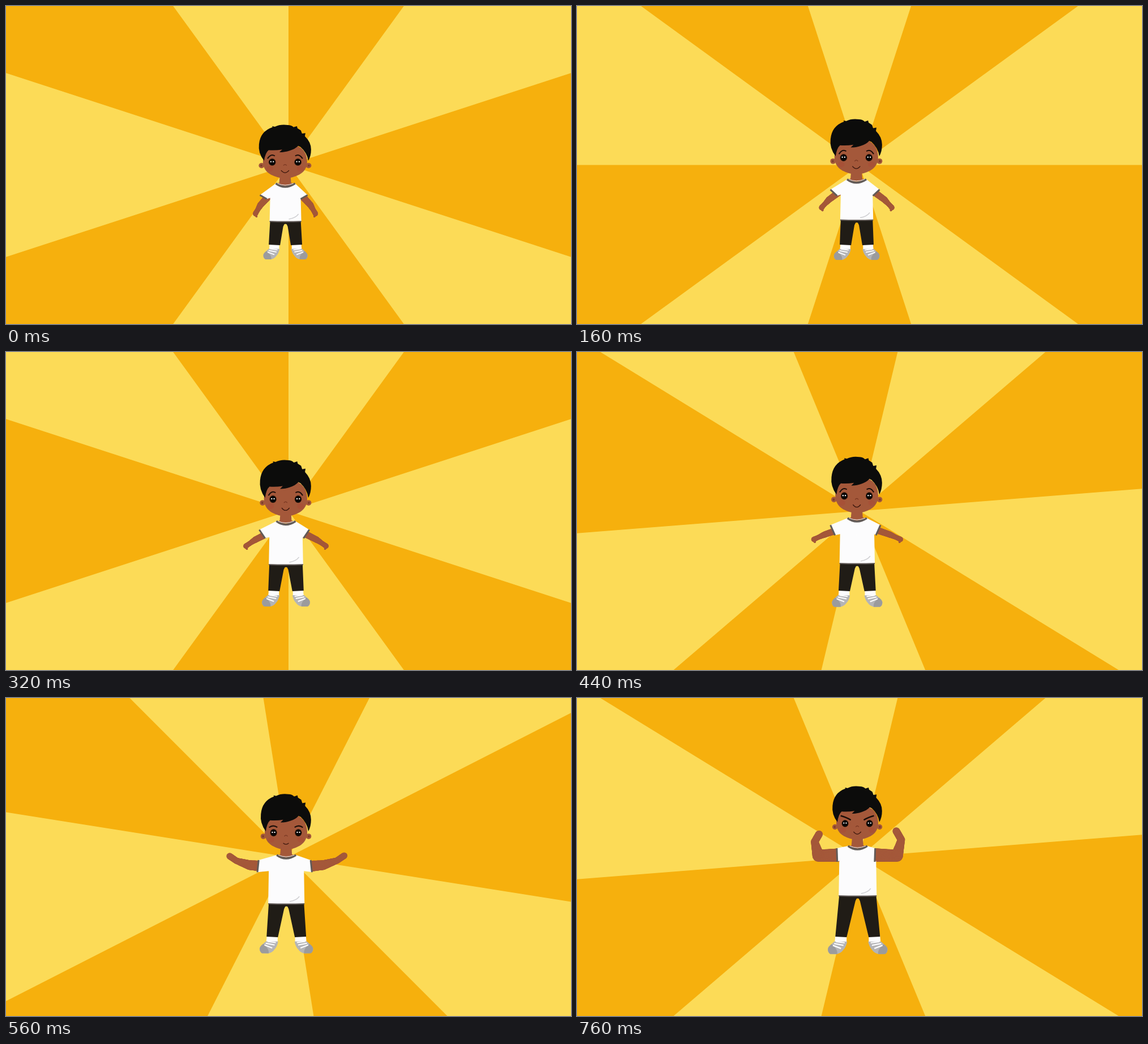
Write an HTML page with a canvas that moves like this. It is 998 px wide and 561 px high and loops after 800 ms.

```html
<!DOCTYPE html>
<html lang="en">
<head>
<meta charset="utf-8">
<title>Flexing boy</title>
<style>
html, body { margin: 0; width: 100%; height: 100%; overflow: hidden; background: #fcdb57; }
canvas { display: block; }
</style>
</head>
<body>
<canvas id="stage" width="998" height="561"></canvas>
<script>
const ctx = document.getElementById('stage').getContext('2d');
const LOOP = 800, STEP = 40, LAST = LOOP / STEP - 1, FLOOR = 421;
const SKIN = '#a4583a', HAIR = '#0c0c0b', CLOTH = '#201c16', TRIM = '#625b58', WHITE = '#fcfcfd';

// Key poses: arms down, arms out, arms raised, flexed. Angles are in degrees below horizontal.
const POSES = [
  { at: 0, neck: 313, hem: 380, muscle: 0, sleeve: 8, upper: 60, fore: 60, upperLength: 16, foreLength: 18 },
  { at: 11, neck: 293, hem: 373, muscle: 0, sleeve: 9, upper: 24, fore: 24, upperLength: 18, foreLength: 22 },
  { at: 14, neck: 277, hem: 363, muscle: .6, sleeve: 15, upper: -6, fore: -18, upperLength: 18, foreLength: 39 },
  { at: LAST, neck: 261, hem: 349, muscle: 1, sleeve: 0, upper: 2, fore: -75, upperLength: 36, foreLength: 41 }
];

const hair = new Path2D('M-37-9Q-48-24-46-40Q-44-64-22-72L-23-74L-18-73Q-8-78 5-76Q11-76 15-72L21-74L22-70L28-66L30-60L36-61L35-55Q46-44 46-30Q46-18 41-9Q39-24 27-35L23-37Q18-31 8-28Q0-25-10-25L-5-30Q-18-28-29-29Q-35-24-37-9Z');
const face = new Path2D('M-39-8Q-39 9-25 17Q-12 24 0 24Q12 24 25 17Q39 9 39-8Q38-40 0-42Q-38-40-39-8Z');
const shoe = new Path2D('M-10 8Q-8 17-4 21Q0 27 7 28L17 27.5Q22 25 21 19Q17 13 11 8Z');
const toe = new Path2D('M6 28Q5 21 12 15L15 12Q21 16 21 20Q21 26 17 28Z');
const laces = new Path2D('M-6 10L8 8M-4 14L11 11M0 19L13 14');

const mix = (a, b, k) => a + (b - a) * k;

function poseAt(step) {
  const next = Math.max(1, POSES.findIndex(pose => pose.at >= step));
  const a = POSES[next - 1], b = POSES[next], k = (step - a.at) / (b.at - a.at), u = step / LAST;
  const pose = {};
  for (const name in a) pose[name] = mix(a[name], b[name], k);
  if (step > POSES[2].at) pose.sleeve = 0;
  pose.growth = u;
  pose.width = 28 + 5.5 * u;
  pose.ankle = 19.5 + 10 * u * u;
  pose.cuffX = pose.width + pose.sleeve;
  pose.cuffY = pose.neck + 24 - 8 * u * u;
  pose.cuffSize = 7 + 5 * u;
  return pose;
}

function fill(color, path) {
  ctx.fillStyle = color;
  path ? ctx.fill(path) : ctx.fill();
}

function poly(color, ...points) {
  ctx.beginPath();
  points.forEach(([x, y]) => ctx.lineTo(x, y));
  fill(color);
}

function oval(color, x, y, rx, ry = rx) {
  ctx.beginPath();
  ctx.ellipse(x, y, rx, ry, 0, 0, 7);
  fill(color);
}

function curve(color, width, x0, y0, cx, cy, x1, y1) {
  ctx.beginPath();
  ctx.moveTo(x0, y0);
  ctx.quadraticCurveTo(cx, cy, x1, y1);
  ctx.strokeStyle = color;
  ctx.lineWidth = width;
  ctx.stroke();
}

function bothSides(draw) {
  for (const side of [-1, 1]) {
    ctx.save();
    ctx.scale(side, 1);
    draw(side);
    ctx.restore();
  }
}

function polar([x, y], degrees, length) {
  const angle = degrees * Math.PI / 180;
  return [x + Math.cos(angle) * length, y + Math.sin(angle) * length];
}

// Tapered limb through points [x, y, radius].
function limb(...points) {
  for (let i = 1; i < points.length; i++)
    for (let k = 0; k <= 1.001; k += .04)
      oval(SKIN, ...points[i].map((v, n) => mix(points[i - 1][n], v, k)));
}

function drawRays(step) {
  ctx.fillStyle = '#fcdb57';
  ctx.fillRect(0, 0, 998, 561);
  for (let i = 0; i < 5; i++) {
    const start = (step * 4.5 + i * 72 - 90) * Math.PI / 180;
    ctx.beginPath();
    ctx.moveTo(499, 280.5);
    ctx.arc(499, 280.5, 700, start, start + Math.PI / 5);
    fill('#f6b00d');
  }
}

function drawLeg({ ankle, hem, width, growth }) {
  const size = .93 + .17 * growth;
  ctx.save();
  ctx.translate(ankle, FLOOR);
  ctx.scale(size, size);
  poly(WHITE, [-9, -2], [9, -2], [10, 9], [-9, 9]);
  fill('#b4b4b6', shoe);
  fill('#9b9b9d', toe);
  ctx.strokeStyle = WHITE;
  ctx.lineWidth = 2;
  ctx.stroke(laces);
  ctx.restore();
  poly(CLOTH, [-1, hem - 2], [width - 1, hem - 2], [ankle + 10, FLOOR], [ankle - 10, FLOOR + 1],
    [4, hem + 9], [2, hem + 5], [-1, hem + 4]);
}

function drawArm(p, side) {
  const m = p.muscle, reach = p.foreLength + (side > 0 ? 6 * m * m : 0);
  const shoulder = [p.cuffX, p.cuffY];
  const elbow = polar(shoulder, p.upper, p.upperLength);
  const wrist = polar(elbow, p.fore, reach * .62);
  const hand = polar(wrist, p.fore - 45 * m * m, reach * .38);
  limb([p.cuffX - 5, p.cuffY, 6 + 6 * m], [...elbow, 5.5 + 5 * m], [...wrist, 4 + 2.5 * m], [...hand, 4.5 + 2 * m]);
  if (!m) limb([...hand, 3], [hand[0] - 2, hand[1] + 5, 1.5]);
}

function drawShirt(p) {
  const { neck, hem, width } = p;
  bothSides(side => {
    const middle = [p.cuffX - 3 * side, p.cuffY];
    const cuff = polar(middle, p.upper - 90, p.cuffSize), pit = polar(middle, p.upper + 90, p.cuffSize);
    poly(WHITE, [-1, neck + 6], [17, neck], cuff, pit, [width - 1, pit[1] - 2], [width, hem], [-1, hem]);
    curve(TRIM, 3, ...cuff, ...middle, ...pit);
  });
  curve('#cfcfd2', 1.5, 23, hem - 13, 18, hem - 6, 6, hem - 4);
  curve(TRIM, 2, -width, hem, 0, hem + 1, width, hem);
  poly(SKIN, [-10, neck - 13], [9, neck - 13], [10, neck - 1], [15, neck], [5, neck + 4], [-6, neck + 4], [-16, neck], [-11, neck - 1]);
  curve(TRIM, 3.5, -17, neck, -1, neck + 12, 17, neck);
  curve('#eee', 1, -14, neck, -1, neck + 6, 14, neck);
}

function drawHead({ neck, muscle: m, growth: u }) {
  const frown = m * m, dip = 4 * m * (1 - m), smile = 7 - 2 * dip, mouthY = 9 + 3.5 * dip;
  ctx.translate(-.7, neck - 31.5 - 2 * u);
  ctx.scale(1 - .05 * u, .94 + .05 * Math.sin(Math.PI * u));
  bothSides(() => {
    oval(SKIN, 41.5, 0, 5);
    oval('#7d3f29', 42, 0, 1.8, 2.2);
  });
  fill(SKIN, face);
  fill(HAIR, hair);
  bothSides(() => {
    oval('rgba(175,65,50,.3)', 27, 6, 6, 5);
    oval('#45200f', 22.7, -6.5, 6.4, 6.7);
    oval('#0a0706', 22.7, -6.5, 5.6, 6);
    oval('#fff', 20.7, -7.3, 1.2);
    oval('#fff', 25, -7.3, 1.2);
    curve('#1a0d08', 2 + frown * .6, 31, mix(-13, -21, frown), mix(25, 22, frown), mix(-23, -19, frown),
      mix(18, 12, frown), mix(-18, -13, frown));
  });
  curve('#7a3823', 1.2, -3, 0, 0, -4, 3, 0);
  curve('#3a160d', 1.3, -smile, mouthY, 0, 18 - 1.5 * dip, smile, mouthY);
}

function draw(time) {
  const step = Math.floor(time % LOOP / STEP), pose = poseAt(step);
  drawRays(step);
  ctx.save();
  ctx.translate(493.6 + 2.2 * pose.growth, 0);
  bothSides(() => drawLeg(pose));
  bothSides(side => drawArm(pose, side));
  drawShirt(pose);
  drawHead(pose);
  ctx.restore();
}

const begun = performance.now();
function tick() {
  draw(performance.now() - begun);
  requestAnimationFrame(tick);
}
tick();
</script>
</body>
</html>
```
